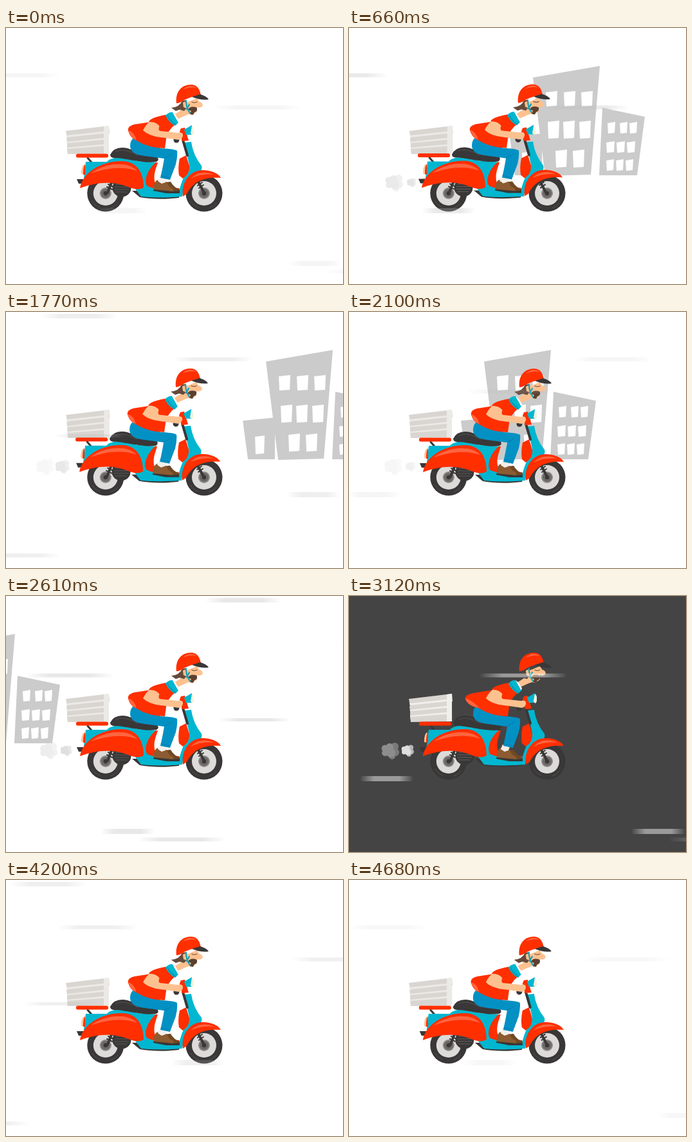
An HTML page for the animation above (4.71 s loop, 524x398 px).

```html
<!DOCTYPE html>
<html lang="en">
<head>
<meta charset="utf-8">
<title>Delivery scooter</title>
<style>
html, body { margin: 0; width: 100%; height: 100%; overflow: hidden; background: #fff; }
svg { display: block; width: 524px; height: 398px; --wind: #b9b9b9; --hair: #654a3b; --box: #d9d6d1; --edge: #eceae7; background: #fff; }
svg.night { background: #444; --wind: #fff; --hair: #484442; --box: #d9d5d0; --edge: #f1efec; }
.red { fill: #ff2f00; }
.shine { fill: #ff6540; }
.teal { fill: #00b6d0; }
.dark { fill: #393737; }
.skin { fill: #fdc18f; }
.jeans { fill: #0391c4; }
.hair { fill: var(--hair); }
.box { fill: var(--box); }
.edge { fill: var(--edge); }
.line { fill: none; stroke-linecap: round; }
.wind stop { stop-color: var(--wind); }
</style>
</head>
<body>
<svg id="stage" viewBox="0 0 524 398">
  <defs>
    <linearGradient id="streak" class="wind">
      <stop offset="0" stop-opacity="0"/>
      <stop offset=".07" stop-opacity=".3"/>
      <stop offset=".26" stop-opacity="1"/>
      <stop offset=".74" stop-opacity="1"/>
      <stop offset=".93" stop-opacity=".3"/>
      <stop offset="1" stop-opacity="0"/>
    </linearGradient>
    <g id="wheel">
      <circle class="dark" r="28.5"/>
      <circle r="19" fill="#dcdbda"/>
      <circle r="9" fill="#8b8886"/>
      <circle r="7" fill="#6b6867"/>
      <circle class="dark" r="3.2"/>
      <path class="line" d="M-21 12A24 24 0 0 0-9 22M8 23A24 24 0 0 0 19 15" stroke="#575453" stroke-width="1"/>
    </g>
    <g id="cloud">
      <g opacity=".75"><circle cx="7" cy="-6" r="6"/><circle cx="8" cy="3" r="6"/><circle cx="3" cy="9" r="5"/></g>
      <circle cx="-8" cy="-3" r="5.500"/><circle cx="-1" cy="-5" r="6"/>
      <circle cx="-8" cy="4" r="5"/><circle cx="1" cy="4" r="7"/>
    </g>
    <g id="town">
      <path fill="#cbcbcb" d="M250 169L300 164V229H258ZM286 77L390 59 376 228 305 230ZM394 124L460 138 448 229H389Z"/>
      <g id="panes" fill="#fff"></g>
    </g>
  </defs>

  <g id="city"><use href="#town"/><use href="#town"/></g>
  <g id="smoke"></g>

  <g id="boxes">
    <path class="box" d="M93 160L160 152 161 164 95 171ZM94 171L160 163V174L95 180ZM95 180L160 173V184L95 189ZM95 189L160 183V195L96 196Z"/>
    <path class="edge" d="M94 167L160 160V163L95 170ZM95 177L160 170V173L95 179ZM95 186L160 180V183L95 188ZM152 153L160 152V195H152Z"/>
  </g>

  <g id="ride">
    <path class="line" d="M127 202L134 210" stroke="#393737" stroke-width="3"/>
    <rect class="red" x="109" y="195.500" width="50" height="6" rx="2.500"/>
    <path class="dark" d="M110 235H126V242H113Z"/>
    <path class="dark" d="M196 253H272L269 264Q235 268 208 263Z"/>
  </g>
  <use href="#wheel" x="154.800" y="257"/>
  <use href="#wheel" x="308" y="257"/>
  <g id="top">
    <path class="line" d="M158 256L165 238M309 258L299 239" stroke="#393737" stroke-width="4"/>
    <path class="line" d="M157 247L165 251M159 243L167 247M300 249L307 244M298 245L305 240" stroke="#393737" stroke-width="2"/>
    <path class="teal" d="M124 208H157C165 199 185 201 204 207L234 209C221 222 218 236 220 243Q232 250 273 250L274 262Q238 265 210 262L194 241 150 232 121 234Z"/>
    <path fill="#ffc49a" d="M122 212Q117 213 117 227L121 228Z"/>
    <path class="red" d="M123 212Q120 214 120 228L123 228Z"/>
    <path class="red" d="M233 209C220 219 213 240 220 246Q235 253 270 252L269 249C248 249 232 246 231 238C229 226 234 217 236 209Z"/>
    <ellipse class="dark" cx="180" cy="249" rx="14.500" ry="13.500"/>
    <path class="line" d="M171 243H189M169 247H191M169 251H191M171 255H188" stroke="#5d5a59" stroke-width="1.200"/>
    <path class="red" d="M115 249C119 225 147 207 180 207C207 207 214 230 214 248C207 252 199 251 190 247C166 237 139 240 115 249Z"/>
    <path class="shine" d="M132 226C150 211 188 205 204 222C180 214 156 218 132 226Z"/>
    <path class="dark" d="M162 197Q169 183 189 187Q211 195 235 200Q239 205 234 208C214 211 190 203 172 202Q162 203 162 197Z"/>
    <path class="line" d="M171 192Q184 186 205 198" stroke="#4b4847" stroke-width="1.500"/>

    <path class="red" d="M270 203Q267 217 269 229L275 234Q287 227 285 214L280 198Z"/>
    <path class="teal" d="M277 178L288 177Q291 198 304 214Q306 221 300 224C285 231 277 244 274 262H267Q271 244 276 233Q286 228 285 213Z"/>
    <path class="line" d="M275 174L282 198" stroke="#393737" stroke-width="4"/>
    <path class="red" d="M275 262C272 238 288 221 305 221C321 221 331 227 334 233C307 231 291 239 281 258Z"/>
    <path class="shine" d="M287 234Q302 219 324 228Q304 226 287 234Z"/>

    <path fill="#6f4824" d="M240 250Q238 240 247 240L256 239Q261 248 270 251V256H244Z"/>
    <path fill="#8c5b31" d="M230 251Q229 239 236 236L241 241 250 239Q252 247 260 250V256L232 253Z"/>
    <path fill="#f3efe9" d="M239 231L250 235 248 240 242 242 236 238Z"/>
    <path class="dark" d="M229 251L260 254 270 253V257L249 257 229 253Z"/>
    <path class="jeans" d="M197 172L241 187Q262 188 266 191Q267 200 264 212L255 236 240 233Q244 216 246 203L216 199Q194 197 193 184Q193 176 197 172Z"/>
    <path class="line" d="M246 202Q253 200 257 196M241 230L254 233" stroke="#0579aa" stroke-width="1"/>

    <path class="red" id="shirt"/>
    <path class="shine" id="fold"/>
    <path class="red" d="M272 156L278 155 284 175 274 176 270 161Z"/>
    <path class="teal" d="M277 158L289 151 290 166 280 166Z"/>
    <path fill="#f4f0dc" d="M289 152Q293 153 292 164L290 167 287 164Z"/>
    <circle class="dark" cx="265" cy="174" r="4.500"/>
    <path class="skin" d="M213 159Q222 142 232 143L239 152Q236 157 239 160L267 163Q276 161 275 168Q273 176 263 173L241 170Q222 168 213 159Z"/>
    <path class="red" d="M222 146Q224 139 249 135L252 145 239 153Q233 145 222 146Z"/>

    <path class="skin" d="M261 135L275 126 290 132 279 136 268 141Z"/>
    <path class="teal" d="M248 136Q254 130 259 131L268 147 263 152Q253 147 248 136Z"/>
    <path fill="#fff" d="M259 131L263 134 269 143 268 147Z"/>
    <path class="line" d="M251 136Q255 145 263 150" stroke="#0795ae" stroke-width="1.500"/>
    <path class="skin" d="M273 119L297 109 300 114Q308 117 305 122Q301 125 297 123L297 130 289 135 277 132Z"/>
    <path class="hair" d="M257 124Q270 123 274 113L281 112 281 124 277 129 270 127 264 129Z"/>
    <path class="skin" d="M275 116Q282 112 284 119L281 125 276 123Z"/>
    <path fill="#5b4032" d="M283 127Q287 120 297 124Q298 130 293 131L291 135 286 134 288 129Z"/>
    <path class="line" d="M289 115Q293 117 297 115" stroke="#704c38" stroke-width="1.200"/>
    <path class="line" d="M280 113Q280 124 286 132M285 119L281 126" stroke="#139fb5" stroke-width="2.200"/>
    <path class="red" d="M265 117C263 99 273 88 288 88C298 88 302 97 303 105Q288 106 277 112Q270 117 265 117Z"/>
    <path class="shine" d="M275 96Q285 86 297 93Q284 91 275 96Z"/>
    <path class="dark" d="M289 107L302 103Q312 106 315 111Q304 113 289 107Z"/>
  </g>
  <g id="streaks" fill="url(#streak)"></g>
</svg>
<script>
const LOOP = 4710, STEP = 30, FRAMES = LOOP / STEP;
const NIGHT = [2760, 4080];
const $ = id => document.getElementById(id);
const add = (parent, tag, attrs) => {
  const el = document.createElementNS('http://www.w3.org/2000/svg', tag);
  for (const k in attrs) el.setAttribute(k, attrs[k]);
  return parent.appendChild(el);
};
const move = (el, x, y, s = 1) => el.setAttribute('transform', `translate(${x} ${y}) scale(${s})`);

// Windows: y, height, width, then the left edges
[
  [99, 23, 18, 306, 334, 361],
  [145, 27, 18, 309, 333, 358],
  [190, 27, 18, 321, 348],
  [147, 17, 12, 402, 421, 436],
  [177, 17, 13, 400, 416, 432],
  [205, 17, 12, 400, 415, 430],
  [193, 28, 15, 269]
].forEach(([y, h, w, ...xs]) => xs.forEach(x => add($('panes'), 'path', {
  d: `M${x} ${y + 1}l${w}-2-1 ${h}-${w - 2} 1z`
})));

// Two groups of streaks; each sweeps by at its own set of steps
const SPEED = 40;
const groups = [
  { passes: [0, 21.4, 45.4, 66.5, 79.7, 101, 125.1, 143, 157],
    lines: [[-40, 73.5, 124, 6, 1], [323, 123.5, 136, 6, 1], [137, 284, 83, 8, 1]] },
  { passes: [0, 24.2, 45.3, 79.7, 104, 125.1, 157],
    lines: [[439, 366, 84, 8, 1], [497, 378.5, 136, 6, .4], [601, 6.5, 120, 7, .6], [624, 192.5, 110, 5, .7]] }
];
const streaks = groups.flatMap(g => g.passes.flatMap(at => g.lines.map(([x, y, w, h, alpha]) => ({
  at, x, w, alpha,
  el: add($('streaks'), 'rect', { y: y - h / 2, width: w, height: h, rx: h / 2 })
}))));

const PUFFS = 10;
const puffs = [0, 1].map(() => add($('smoke'), 'use', { href: '#cloud' }));
const towns = [...$('city').children];

// Piecewise-linear strength of the wind over the loop
const gusts = [[0, .4], [660, .85], [1350, 1], [2100, .4], [2700, 1], [3900, 1], [4300, .5], [LOOP, .3]];
function gust(t) {
  const k = gusts.findIndex(p => p[0] > t);
  const [t0, a] = gusts[k - 1], [t1, b] = gusts[k];
  return a + (b - a) * (t - t0) / (t1 - t0);
}

function draw(t) {
  const i = Math.floor(t / STEP), time = i * STEP;
  const night = time >= NIGHT[0] && time < NIGHT[1];
  const force = gust(time);
  $('stage').classList.toggle('night', night);

  const sway = Math.cos(2 * Math.PI * 18 * i / FRAMES) - 1;
  move($('ride'), sway, sway * .3);
  move($('top'), sway, sway * .3);
  move($('boxes'), -sway * .4, 0);

  // The shirt tail billows at night
  const back = night ? 181 : 190;
  $('shirt').setAttribute('d', `M${back} 160Q${back - 2} 153 199 150L225 146Q232 138 249 135L263 150Q250 161 249 173L247 187Q222 187 201 174Q${back + 3} 170 ${back} 160Z`);
  $('fold').setAttribute('d', `M${back} 159Q${back + 9} 161 203 174Q${back + 3} 171 ${back} 159Z`);

  move(towns[0], (22 - i) * 17.65, 0);
  move(towns[1], (70 - i) * 17.65 - 76, 0);

  const phase = PUFFS * i / FRAMES % 1;
  puffs.forEach((p, k) => {
    const age = phase + k;
    const show = time < 4150 && (time > 300 || !k);
    const fade = Math.min(1, 2.1 - age, .1 + 2 * age);
    move(p, 108 - 27 * age, 240, Math.min(1, .2 + .8 * age));
    p.setAttribute('fill', night ? '#dedede' : '#d4d4d4');
    p.setAttribute('opacity', show ? Math.max(0, fade) * (night ? 1 : .8 * force) : 0);
  });

  for (const s of streaks) {
    const x = s.x - SPEED * (i - s.at);
    const seen = x < 524 && x > -s.w;
    s.el.style.display = seen ? '' : 'none';
    if (!seen) continue;
    s.el.setAttribute('x', x);
    s.el.setAttribute('opacity', night ? .46 * s.alpha : .36 * force);
  }
}

const start = performance.now();
function tick() {
  draw((performance.now() - start) % LOOP);
  requestAnimationFrame(tick);
}
tick();
</script>
</body>
</html>
```
